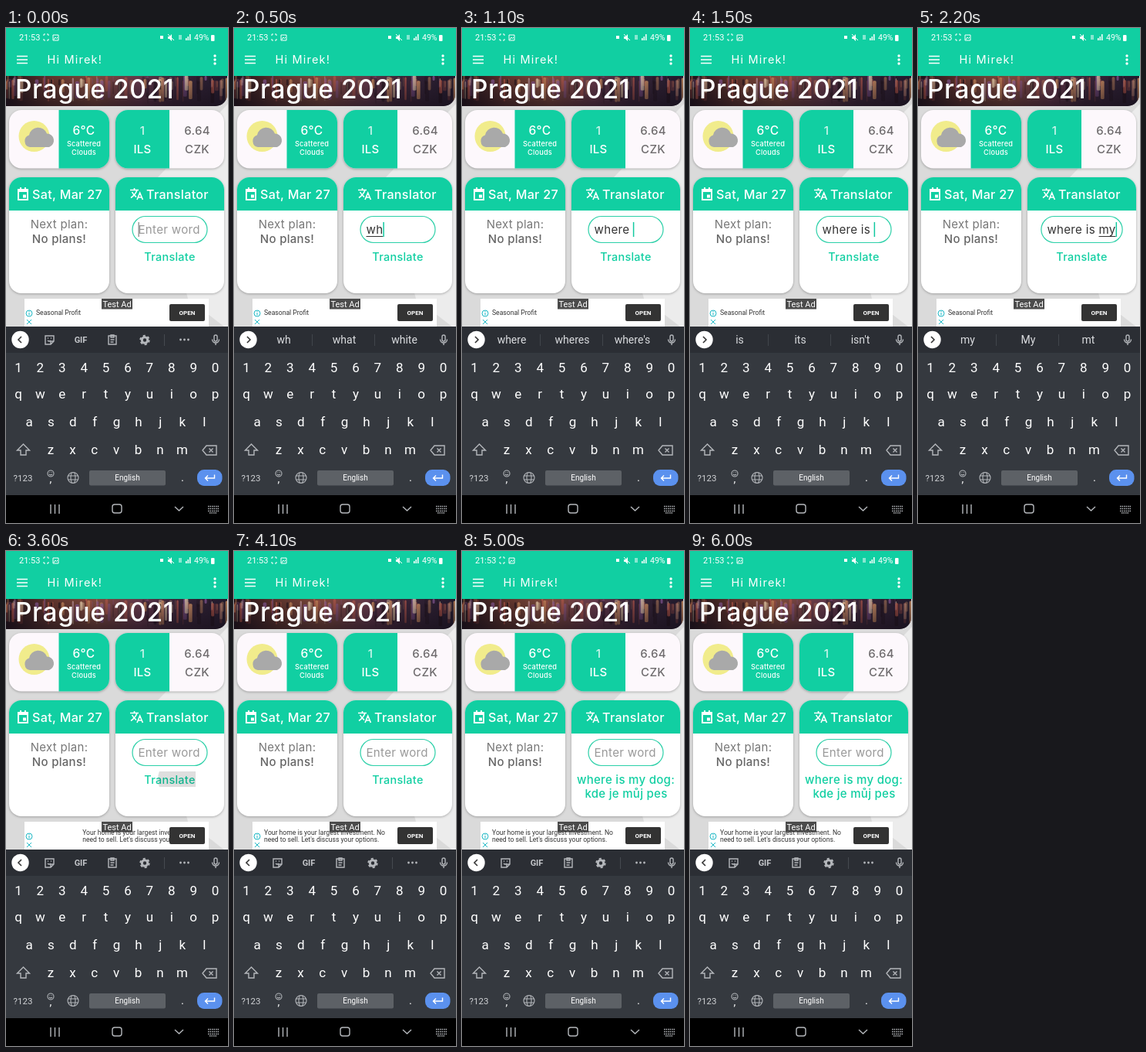
These frames come from a looping animation (288 px wide and 640 px high, 6.5 s). An HTML page:

```html
<!DOCTYPE html>
<html lang="en">
<head>
<meta charset="utf-8">
<title>Translator widget</title>
<style>
html, body { margin: 0; width: 100%; height: 100%; overflow: hidden; background: #000; }
svg { display: block; width: 288px; height: 640px; }
text { font-family: Inter, "Open Sans", sans-serif; letter-spacing: .02em; white-space: pre; }
.r text, text.r { font-family: Roboto, "Liberation Sans", sans-serif; letter-spacing: 0; }
.m { text-anchor: middle; }
.w { fill: #fff; }
.g { fill: #11cfa2; }
.b { font-weight: 500; }
.line { fill: none; stroke: #fff; stroke-width: 1.4; }
.icon { fill: none; stroke: #b4b7bb; stroke-width: 1.4; }
.card { filter: drop-shadow(0 1px 1.5px #0004); }
</style>
</head>
<body>
<svg viewBox="0 0 288 640">
  <defs>
    <linearGradient id="night">
      <stop offset="0" stop-color="#1c1118"/><stop offset=".2" stop-color="#5e342c"/>
      <stop offset=".4" stop-color="#7d4a3c"/><stop offset=".6" stop-color="#64394a"/>
      <stop offset=".75" stop-color="#3a2638"/><stop offset="1" stop-color="#201a2c"/>
    </linearGradient>
    <linearGradient id="dusk" x2="0" y2="1">
      <stop offset="0" stop-color="#160e18" stop-opacity="0"/>
      <stop offset="1" stop-color="#160e18" stop-opacity=".6"/>
    </linearGradient>
    <clipPath id="photoClip"><path d="M0 62H287V86a15 15 0 0 1-15 15H0z"/></clipPath>
    <clipPath id="adClip"><rect x="38" y="350" width="174" height="36"/></clipPath>
    <clipPath id="tapClip"><rect x="178" y="285" width="68" height="20"/></clipPath>
  </defs>

  <rect width="288" height="390" fill="#dadada"/>
  <path d="M288 98L196 194 236 350 288 390z" fill="#ececec"/>
  <rect class="g" width="288" height="62"/>

  <!-- status bar and toolbar -->
  <g class="w r">
    <text x="17" y="16" font-size="11">21:53</text>
    <text x="244" y="16" font-size="10.5">49%</text>
    <rect x="200" y="10" width="4" height="4"/>
    <path d="M210 11h2l3-3v9l-3-3h-2zM233 16v-3h1.5v3zm2.5 0v-5h1.5v5zm2.5 0V8h1.5v8z"/>
    <rect x="266" y="9" width="4.5" height="8" rx="1"/>
    <path class="line" style="stroke-width:1" d="M49 10V8h2m2 0h2v2m0 4v2h-2m-2 0h-2v-2M61 9h7v7h-7zm1 6 2-3 1.5 1.5L67 12M210 8l8 8M225 9v6m2-6v6"/>
  </g>
  <path class="line" d="M14 36.5h14M14 41h14M14 45.5h14" style="stroke-width:1.6"/>
  <text class="w" x="53.5" y="46" font-size="14.5" style="letter-spacing:1.2px">Hi Mirek!</text>
  <g class="w"><circle cx="271" cy="36" r="1.7"/><circle cx="271" cy="41" r="1.7"/><circle cx="271" cy="46" r="1.7"/></g>

  <g clip-path="url(#photoClip)">
    <rect y="62" width="288" height="39" fill="url(#night)"/>
    <g id="lights"></g>
    <rect y="62" width="288" height="39" fill="url(#dusk)"/>
  </g>
  <text class="w b" x="12" y="91" font-size="33.4">Prague 2021</text>

  <!-- weather and currency -->
  <g class="card">
    <rect x="4" y="106" width="130" height="75.5" rx="16" fill="#fdf8fc"/>
    <path class="g" d="M68.5 106H118a16 16 0 0 1 16 16v43.5a16 16 0 0 1-16 16H68.5z"/>
  </g>
  <circle cx="36.5" cy="140" r="20" fill="#f1ec8c"/>
  <path d="M31 154a8 8 0 0 1-1-15.500 12 12 0 0 1 23-2A9 9 0 0 1 56 154z" fill="#a9a9a9"/>
  <g class="w m b">
    <text x="101" y="138" font-size="15.5">6°C</text>
    <text x="101" y="153" font-size="9.2">Scattered</text>
    <text x="101" y="164" font-size="9.2">Clouds</text>
  </g>
  <g class="card">
    <rect x="142" y="106" width="141" height="75.5" rx="16" fill="#fdf8fc"/>
    <path class="g" d="M212 106H158a16 16 0 0 0-16 16v43.5a16 16 0 0 0 16 16h54z"/>
  </g>
  <g class="m b" font-size="15">
    <g class="w"><text x="177" y="138" opacity=".8">1</text><text x="177" y="161.5">ILS</text></g>
    <g fill="#6f6c6e"><text x="248" y="138">6.64</text><text x="248" y="161.5">CZK</text></g>
  </g>

  <!-- plans -->
  <g class="card">
    <rect x="4" y="193" width="130" height="150" rx="16" fill="#fff"/>
    <path class="g" d="M4 236v-27a16 16 0 0 1 16-16h98a16 16 0 0 1 16 16v27z"/>
  </g>
  <path class="line" d="M16 209h12v13H16zm0 2h12M19 206v3m6-3v3" style="stroke-width:2"/>
  <rect class="w" x="22" y="215.5" width="4" height="4"/>
  <text class="w b" x="34" y="221" font-size="16.1">Sat, Mar 27</text>
  <g class="m" font-size="15">
    <text x="69" y="259" fill="#777">Next plan:</text>
    <text class="b" x="69" y="278" fill="#666">No plans!</text>
  </g>

  <!-- translator -->
  <g class="card">
    <rect x="142" y="193" width="141" height="150" rx="16" fill="#fff"/>
    <path class="g" d="M142 236v-27a16 16 0 0 1 16-16h109a16 16 0 0 1 16 16v27z"/>
  </g>
  <path class="line" d="M161 209.5h11M166.5 207v2.5M170 209.5q-2 6-8 10M163.5 212q2 4 5.5 6.5M170 222l3.7-9 3.7 9M171.5 219h4.5" style="stroke-width:1.6"/>
  <text class="w b" x="182" y="221" font-size="16.1">Translator</text>
  <rect id="pill" y="243.5" height="34" rx="17" fill="#fff" stroke="#2cd0a8" stroke-width="1.2"/>
  <text id="entry" y="266" font-size="15.1"></text>
  <path id="underline" stroke="#333"/>
  <path id="cursor" stroke="#13c9a0" stroke-width="1.5"/>
  <g class="g m b">
    <text id="button" x="212.5" y="301" font-size="14.4">Translate</text>
    <g id="result" font-size="15">
      <text x="212.5" y="301">where is my dog:</text>
      <text x="213" y="319">kde je můj pes</text>
    </g>
  </g>
  <circle id="ripple" cx="225" cy="295" clip-path="url(#tapClip)"/>

  <!-- advert -->
  <rect x="24" y="350" width="239" height="36" fill="#fff"/>
  <g clip-path="url(#adClip)" class="r" font-size="8.6" fill="#333">
    <text id="oldAd" y="371">Seasonal Profit</text>
    <g id="newAd">
      <text y="366.5">Your home is your largest investment. No</text>
      <text y="375.5">need to sell. Let's discuss your options.</text>
    </g>
  </g>
  <path fill="none" stroke="#1fb9c6" d="M34 369a4 4 0 1 1-8 0a4 4 0 1 1 8 0M30 368v3.5m0-5.5v1M27 377l6 6m0-6-6 6"/>
  <rect x="212" y="357" width="46" height="22" rx="2" fill="#333"/>
  <text class="w m r" x="235" y="371" font-size="8" font-weight="700">OPEN</text>
  <rect x="124" y="350" width="40" height="13.5" fill="#333" opacity=".88"/>
  <text class="w m r" x="144" y="361" font-size="11">Test Ad</text>

  <!-- keyboard -->
  <rect y="386" width="288" height="218" fill="#35393f"/>
  <rect y="386" width="288" height="34" fill="#2b2e34"/>
  <circle class="w" cx="18.5" cy="403" r="11.2"/>
  <path id="chevron" fill="none" stroke="#333" stroke-width="1.6"/>
  <g id="tools">
    <path class="icon" d="M51 398h11v7l-4 4h-7zm11 7h-4v4M54 401h1m3 0h1M54 404q2 2 4 0M133 398h10v11h-10zm3-1h4v3h-4zM135.500 403h5m-5 3h4"/>
    <text class="m r" x="97" y="407" font-size="11" font-weight="700" fill="#c4c6ca">GIF</text>
    <circle cx="180" cy="403.5" r="3.7" fill="none" stroke="#b4b7bb" stroke-width="3"/>
    <circle cx="180" cy="403.5" r="5.7" fill="none" stroke="#b4b7bb" stroke-width="2" stroke-dasharray="3 2.97"/>
    <path d="M205.5 396v15" stroke="#45494f"/>
    <g fill="#b4b7bb"><circle cx="226.5" cy="403" r="1.4"/><circle cx="231.5" cy="403" r="1.4"/><circle cx="236.5" cy="403" r="1.4"/></g>
  </g>
  <g id="hints" class="m r" font-size="14" fill="#dadcdf">
    <path d="M101.5 396v15M182.5 396v15" stroke="#41454b"/>
    <text x="64.5" y="408"></text><text x="143" y="408"></text><text x="221" y="408"></text>
  </g>
  <path class="icon" d="M270 399a2 2 0 0 1 4 0v4a2 2 0 0 1-4 0zM267.5 402.5a4.500 4.500 0 0 0 9 0M272 407v3"/>
  <g id="keys" class="w m r" font-size="17"></g>
  <path class="icon" d="M22.5 538l8 8h-4.5v6h-7v-6h-4.5zM260 540h13v12h-13l-5-6zm3.5 3.5l5 5m0-5-5 5"/>
  <path class="icon" style="stroke-width:1.1" d="M62 576a4 4 0 1 1-8 0a4 4 0 1 1 8 0M56 577q2 2 4 0M56.5 574.5h.8m1.7 0h.8M94 581.5a7 7 0 1 1-14 0a7 7 0 1 1 14 0M90 581.5a3 7 0 1 1-6 0a3 7 0 1 1 6 0M81 579h12m-12 5h12"/>
  <rect x="108" y="572" width="99" height="19.5" rx="2" fill="#5d6166"/>
  <rect x="248" y="571" width="32.5" height="21" rx="9" fill="#5b91ee"/>
  <path class="line" d="M270.5 577.5v4.5h-12m3.5-3.5-3.5 3.5 3.5 3.5"/>
  <g class="w m r">
    <text x="22" y="586" font-size="11.5" fill="#d0d2d5">?123</text>
    <text x="58" y="588" font-size="14">,</text>
    <text x="157.5" y="585" font-size="10">English</text>
    <text x="229" y="586" font-size="15">.</text>
  </g>
  <rect y="604" width="288" height="36" fill="#000"/>
  <path class="icon" d="M58 616v12m5.5-12v12m5.5-12v12M141 616h6a3 3 0 0 1 3 3v5a3 3 0 0 1-3 3h-6a3 3 0 0 1-3-3v-5a3 3 0 0 1 3-3zM219 619l5.5 5 5.5-5"/>
  <path class="icon" stroke-dasharray="1.5 1" d="M262 618.5h14m-14 3h14m-14 3h14M264 627h10"/>
</svg>
<script>
const LOOP = 6500, STEP = 100, CENTER = 212.5;
const CLEAR = 3500, ANSWER = 4500;
const $ = id => document.getElementById(id);
const set = (id, attrs) => {
  for (const name in attrs) $(id).setAttribute(name, attrs[name]);
};
const show = (id, on) => set(id, { visibility: on ? 'visible' : 'hidden' });
const add = (parent, tag, attrs, text = '') => {
  const el = document.createElementNS('http://www.w3.org/2000/svg', tag);
  for (const name in attrs) el.setAttribute(name, attrs[name]);
  el.textContent = text;
  $(parent).append(el);
};

// start time, text in the field, suggestions
const typing = [
  [300, 'w', 'w what we'],
  [500, 'wh', 'wh what white'],
  [700, 'whe', 'whe when where'],
  [800, 'wher', 'wher where were'],
  [900, 'where', 'where wheres where\'s'],
  [1000, 'where ', 'where wheres where\'s'],
  [1200, 'where i', 'i is I'],
  [1400, 'where is', 'is its isn\'t'],
  [1500, 'where is ', 'is its isn\'t'],
  [1900, 'where is m', 'm my me'],
  [2100, 'where is my', 'my My mt'],
  [2300, 'where is my ', 'my My mt'],
  [2500, 'where is my d', 'd do did'],
  [2600, 'where is my do', 'do don\'t dog'],
  [2800, 'where is my dog', 'do don\'t dog'],
  [3000, 'where is my dog', 'dog dogs Dog'],
  [CLEAR, '', '']
];

const rows = [['1234567890', 16, 445], ['qwertyuiop', 16, 479], ['asdfghjkl', 30, 515], ['zxcvbnm', 58, 551]];
for (const [chars, x, y] of rows)
  [...chars].forEach((c, i) => add('keys', 'text', { x: x + 28.4 * i, y }, c));

// city lights above dark water
let seed = 7;
const random = () => (seed = seed * 16807 % 2147483647) / 2147483647;
const glows = ['#eda56a', '#c9604e', '#f6dcb4', '#8d5c9e', '#1c1018'];
for (let i = 0; i < 90; i++)
  add('lights', 'rect', {
    x: random() * 288, y: 61 + random() * 8, width: 1 + random() * 4,
    height: 6 + random() * 26, rx: 1.5, fill: glows[i % 5], opacity: 0.2 + random() * 0.5
  });

function drawField(t, text) {
  const entry = $('entry');
  entry.textContent = text || 'Enter word';
  entry.setAttribute('fill', text ? '#333' : '#999');
  const full = entry.getComputedTextLength();
  const width = Math.max(97, full + 16), left = CENTER - width / 2;
  const start = left + 7.5, end = start + (text ? full : 0);
  set('pill', { x: left, width });
  set('entry', { x: start });

  const word = text.match(/\S*$/)[0].length;
  const from = word ? end - entry.getSubStringLength(text.length - word, word) : end;
  set('underline', { d: `M${from} 269.5H${end}` });
  show('underline', word > 0);

  const blink = t >= ANSWER && Math.floor(t / 500) % 2;
  set('cursor', { d: `M${end + 0.7} 251v19`, stroke: t < 300 ? '#999' : '#13c9a0' });
  show('cursor', t < CLEAR || blink);
}

function drawHints(words) {
  const on = words !== '';
  show('hints', on);
  show('tools', !on);
  set('chevron', { d: on ? 'M17 399l4 4-4 4' : 'M20 399l-4 4 4 4' });
  const list = words.split(' ');
  $('hints').querySelectorAll('text').forEach((el, i) => el.textContent = list[i] || '');
}

function drawTap(t) {
  show('button', t < ANSWER);
  show('result', t >= ANSWER);
  set('ripple', {
    r: Math.max(16, Math.min(60, 16 + (t - CLEAR) * 0.12)),
    opacity: t < 4000 ? 0.13 : 0.065
  });
  show('ripple', t >= CLEAR && t < 4100);
}

function drawAd(t) {
  const p = Math.min(1, Math.max(0, (t - 3400) / 500));
  const shift = 190 * (1 - p) ** 2.25;
  set('oldAd', { x: 39 + shift - 190 });
  set('newAd', { transform: `translate(${39 + shift})` });
}

function frame() {
  const t = Math.floor(performance.now() % LOOP / STEP) * STEP;
  const [, text, words] = typing.filter(s => s[0] <= t).pop() || [0, '', ''];
  drawField(t, text);
  drawHints(words);
  drawTap(t);
  drawAd(t);
  requestAnimationFrame(frame);
}
frame();
</script>
</body>
</html>
```
